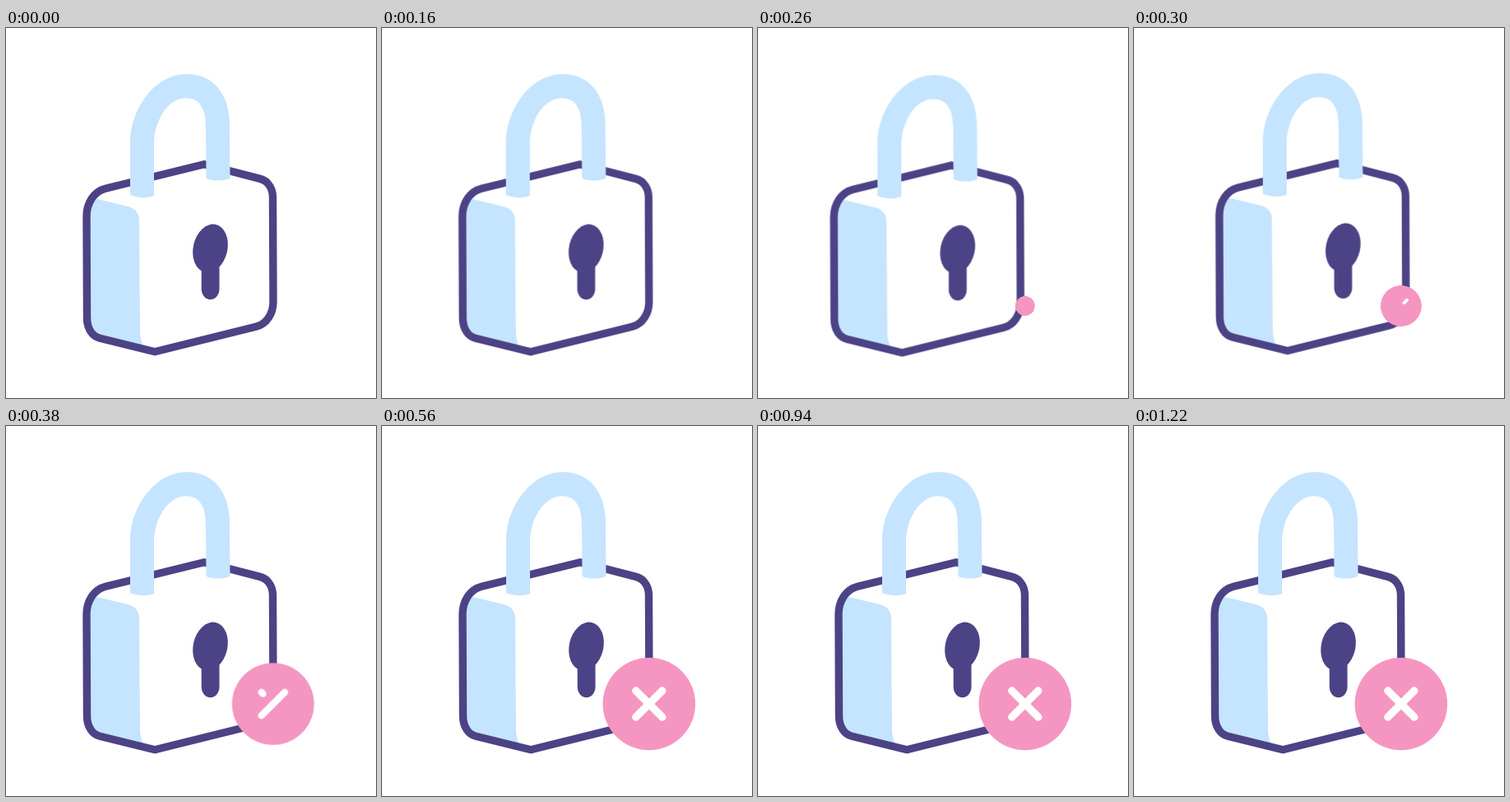
Write an HTML page that moves like this. It is 450 px wide and 450 px high and loops after 1.26 s.

```html
<!DOCTYPE html>
<html lang="en">
<head>
<meta charset="utf-8">
<title>Locked</title>
<style>
  html, body { margin: 0; width: 100%; height: 100%; overflow: hidden; background: #fff; }
  svg { display: block; width: 100%; height: 100%; }

  .lock, .badge, .stroke { animation: 1260ms linear infinite; }
  .lock { animation-name: shake; }
  .badge { transform-origin: 324.8px 338px; animation-name: grow; }
  .stroke {
    fill: none; stroke: #fff; stroke-width: 9.4; stroke-linecap: round;
    stroke-dasharray: 1 2;
  }
  .first { animation-name: draw-first; }
  .second { animation-name: draw-second; }

  /* 80 ms swings, four times, after a short rest */
  @keyframes shake {
    0%, 1.1%, 25.397%, 100% { transform: none; }
    1.587%, 7.937%, 14.286%, 20.635% { transform: translate(-6px, 1.3px); }
    4.762%, 11.111%, 17.46%, 23.81% { transform: translate(6px, -1.3px); }
  }
  @keyframes grow {
    0% { transform: scale(0); }
    15% { transform: scale(0); animation-timing-function: cubic-bezier(.333, 0, .667, 1); }
    34.3%, 100% { transform: scale(1); }
  }
  @keyframes draw-first {
    0% { stroke-dashoffset: 1.02; }
    21.03% { stroke-dashoffset: 1.02; animation-timing-function: cubic-bezier(.333, 0, .667, 1); }
    29.76%, 100% { stroke-dashoffset: 0; }
  }
  @keyframes draw-second {
    0% { stroke-dashoffset: 1.02; }
    28.17% { stroke-dashoffset: 1.02; animation-timing-function: cubic-bezier(.333, 0, .667, 1); }
    39.68%, 100% { stroke-dashoffset: 0; }
  }
</style>
</head>
<body>
<svg viewBox="0 0 450 450">
  <g class="lock">
    <path fill="#c5e4ff" d="M98 228Q102 212 111 208L148 217C157 219 162 225 162 234L163 368Q163 380 168 389L114 376.5C105 374 98 366 98 352Z"/>
    <path fill="none" stroke="#4b4385" stroke-width="9.4" stroke-linejoin="round"
      d="M98 229C98 212.7 107 198.7 121 195.2L241 165.8L309 183.4C319 186 324.5 195.5 324.5 206L325 333C325 347.5 317 360 304 363.3L181 393.8L114 377.2C105 375 98.5 366 98.5 352Z"/>
    <path fill="#c5e4ff" d="M151 203V140C151 100 180 56 220 56C252 56 272 80 272 118L272.5 183Q258 188 243.5 183L243 122C243 97 235 85.3 219 85.3C196 85.3 180 114 180 142V204Q165 209 151 203Z"/>
    <g fill="#4b4385">
      <ellipse cx="248.5" cy="268" rx="20.8" ry="29.8" transform="rotate(13 248.5 268)"/>
      <rect x="237.7" y="275" width="21.8" height="55.3" rx="10.9" ry="13"/>
    </g>
  </g>
  <g class="badge">
    <circle cx="324.8" cy="338" r="56.3" fill="#f595c2"/>
    <path class="stroke first" pathLength="1" d="M340.8 322L308.8 354"/>
    <path class="stroke second" pathLength="1" d="M308.8 322L340.8 354"/>
  </g>
</svg>
</body>
</html>
```
